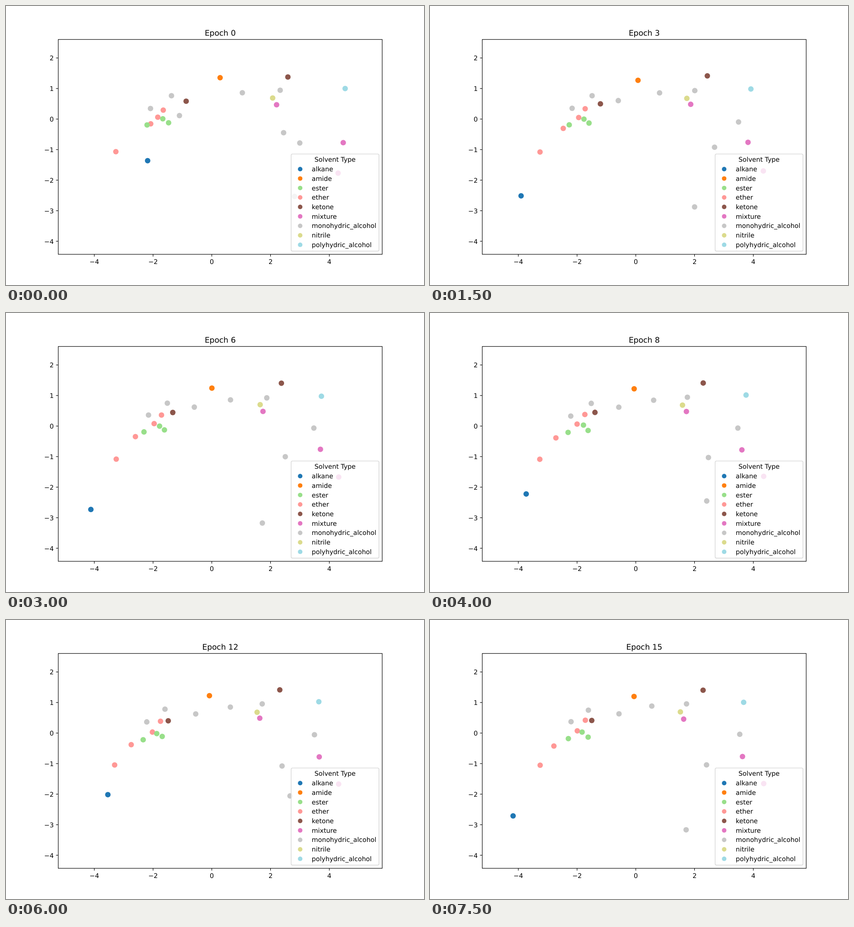
These frames come from a looping animation (917 by 611 pixels, 8000 ms). An HTML page with a canvas:

```html
<!DOCTYPE html>
<html lang="en">
<head>
<meta charset="utf-8">
<title>Solvent embedding by epoch</title>
<style>
  html, body { margin: 0; width: 100%; height: 100%; overflow: hidden; background: #fff; }
  canvas { display: block; width: 917px; height: 611px; }
</style>
</head>
<body>
<canvas id="stage"></canvas>
<script>
const W = 917, H = 611, EPOCH_MS = 500, EPOCHS = 16;
const PT = W / 648; // the figure is 9 inches wide
const EM = 10 * PT;
const FONT = '"DejaVu Sans", sans-serif';
const BOX = { left: W * 0.125, right: W * 0.9, top: H * 0.12, bottom: H * 0.89 };
const COLORS = {
  alkane: '#1f77b4', amide: '#ff7f0e', ester: '#98df8a', ether: '#ff9896',
  ketone: '#8c564b', mixture: '#e377c2', monohydric_alcohol: '#c7c7c7',
  nitrile: '#dbdb8d', polyhydric_alcohol: '#9edae5'
};

const canvas = document.getElementById('stage');
const scale = window.devicePixelRatio || 1;
canvas.width = Math.round(W * scale);
canvas.height = Math.round(H * scale);
const ctx = canvas.getContext('2d');
ctx.textRendering = 'geometricPrecision';

// A dot settles from its start into a home, by default pulled toward the left edge of the cloud.
const dots = [];
function dot(type, x, y, { home = [240 + (x - 240) * 0.89, y], pace = 4, swing = [0, 0] } = {}) {
  dots.push({ color: COLORS[type], x, y, home, pace, swing });
}

dot('monohydric_alcohol', 317, 224.5);
dot('monohydric_alcohol', 363, 196.5);
dot('monohydric_alcohol', 380.5, 240, { home: [416, 205], pace: 1 });
dot('monohydric_alcohol', 518.5, 190);
dot('monohydric_alcohol', 601.5, 184.5);
dot('monohydric_alcohol', 609, 277.5, { home: [678, 252], pace: 1 });
dot('monohydric_alcohol', 644.5, 300, { home: [605, 319] });
dot('monohydric_alcohol', 633, 417, { home: [599, 419], pace: 0.7, swing: [-41, 50] });
dot('alkane', 310.7, 338.8, { home: [207, 403], pace: 0.7, swing: [-26, 33] });
dot('amide', 469.7, 157, { home: [447, 166] });
dot('ketone', 395.2, 208.5, { home: [356, 220] });
dot('ketone', 618.4, 155.6, { home: [598, 152.5] });
dot('ether', 241, 319);
dot('ether', 317.5, 258, { home: [272, 275] });
dot('ether', 333, 243.5);
dot('ether', 345, 228, { home: [338, 221] });
dot('ester', 309.5, 260.5);
dot('ester', 344, 247);
dot('ester', 356.7, 255.8);
dot('nitrile', 585, 201.6);
dot('mixture', 593.6, 216.2);
dot('mixture', 739.8, 299.2, { pace: 2 });
dot('mixture', 728.5, 366, { home: [732, 357] });
dot('polyhydric_alcohol', 744, 180.8, { pace: 2.5 });

// Seeded noise in -1..1
function noise(a, b) {
  const v = Math.sin(a * 12.9898 + b * 78.233) * 43758.5453;
  return (v - Math.floor(v)) * 2 - 1;
}

function place(d, i, epoch) {
  const settled = 1 - Math.exp(-epoch / d.pace);
  const wave = Math.cos((epoch - 5) * Math.PI * 2 / 11);
  const move = (from, home, swing, jitter) =>
    from + settled * (home + swing * wave + jitter - from);
  return [
    move(d.x, d.home[0], d.swing[0], 3 * noise(i, epoch)),
    move(d.y, d.home[1], d.swing[1], 2 * noise(i + 50, epoch))
  ];
}

function text(str, x, y, align = 'left', size = EM) {
  ctx.font = `${size}px ${FONT}`;
  ctx.textAlign = align;
  ctx.fillStyle = '#000';
  ctx.fillText(str, x, y);
}

function disc(x, y, r, color) {
  ctx.fillStyle = color;
  ctx.beginPath();
  ctx.arc(x, y, r, 0, Math.PI * 2);
  ctx.fill();
}

function line(x0, y0, x1, y1) {
  ctx.beginPath();
  ctx.moveTo(x0, y0);
  ctx.lineTo(x1, y1);
  ctx.stroke();
}

const label = v => (v < 0 ? '\u2212' : '') + Math.abs(v);

function drawAxes() {
  const tick = 3.5 * PT;
  ctx.strokeStyle = '#000';
  ctx.lineWidth = 0.8 * PT;
  ctx.strokeRect(BOX.left, BOX.top, BOX.right - BOX.left, BOX.bottom - BOX.top);
  for (let v = -4; v <= 4; v += 2) {
    const x = 451.5 + v * 64.45;
    line(x, BOX.bottom, x, BOX.bottom + tick);
    text(label(v), x, BOX.bottom + 21.2, 'center');
  }
  for (let v = -4; v <= 2; v++) {
    const y = 247.6 - v * 66.9;
    line(BOX.left - tick, y, BOX.left, y);
    text(label(v), BOX.left - 2 * tick, y + 5.3, 'right');
  }
}

function drawLegend() {
  const right = BOX.right - EM / 2, bottom = BOX.bottom - EM / 2;
  const w = 192.7, h = 212.6, left = right - w;
  ctx.beginPath();
  ctx.roundRect(left, bottom - h, w, h, 0.2 * EM);
  ctx.fillStyle = 'rgba(255,255,255,0.8)';
  ctx.fill();
  ctx.strokeStyle = 'rgba(204,204,204,0.8)';
  ctx.lineWidth = PT;
  ctx.stroke();
  text('Solvent Type', left + w / 2, 341.2, 'center');
  Object.keys(COLORS).forEach((name, i) => {
    const y = 362.1 + i * 20.72;
    disc(left + 1.4 * EM, y - 0.35 * EM, 3.5 * PT, COLORS[name]);
    text(name, left + 3.2 * EM, y);
  });
}

function draw(epoch) {
  ctx.setTransform(scale, 0, 0, scale, 0, 0);
  ctx.fillStyle = '#fff';
  ctx.fillRect(0, 0, W, H);
  dots.forEach((d, i) => disc(...place(d, i, epoch), 4.25 * PT, d.color));
  drawAxes();
  text(`Epoch ${epoch}`, (BOX.left + BOX.right) / 2, BOX.top - 6 * PT, 'center', 1.2 * EM);
  drawLegend();
}

const start = performance.now();
function tick() {
  const elapsed = Math.max(0, performance.now() - start);
  draw(Math.floor(elapsed / EPOCH_MS) % EPOCHS);
  requestAnimationFrame(tick);
}
tick();
</script>
</body>
</html>
```
